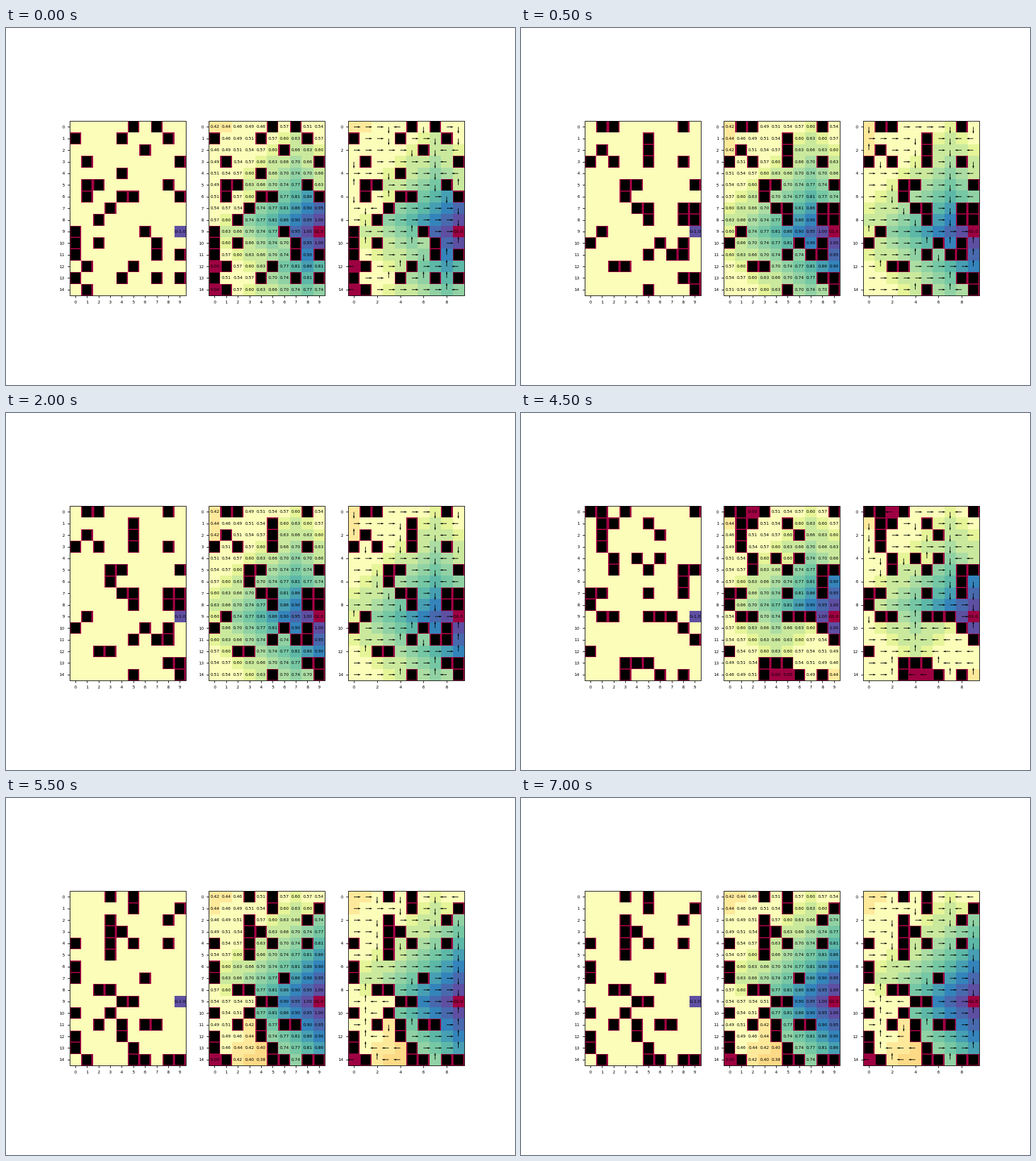
These frames come from a looping animation (894x626 px, 8000 ms). A matplotlib script:

```python
import numpy as np
import matplotlib.pyplot as plt
from matplotlib.animation import FuncAnimation
from matplotlib.patches import Rectangle

DPI = 89.4
ROWS, COLS = 15, 10
GOAL = (9, 9)
DISCOUNT = 0.95
FONT = 6
STEPS = ((0, -1), (0, 1), (-1, 0), (1, 0))  # left, right, up, down

# Wall columns, row by row
MAZE_A = [(5, 7), (0, 4, 8), (6,), (1, 9), (4,), (1, 2, 8), (1, 4, 5, 9), (3,),
          (2,), (0, 6), (0, 2, 7), (0, 7, 9), (1, 5), (0, 4, 7, 9), (1,)]
MAZE_B = [(1, 2, 8), (5,), (1, 5), (0, 2, 5, 8), (), (3, 4, 9), (3,),
          (4, 5, 8, 9), (5, 8, 9), (1,), (0, 6, 8), (5, 7, 8), (2, 3), (8, 9),
          (5, 9)]
MAZE_C = [(0, 1, 3, 9), (1, 2, 5), (1, 6), (1,), (2, 4, 6), (2, 5, 8, 9), (8,),
          (0, 1, 5, 8), (0,), (1, 2, 5, 6, 7), (8,), (9,), (0,), (3, 4, 5),
          (3, 6, 8)]
MAZE_D = [(3, 5), (5, 9), (3, 8), (3, 4), (0, 3, 5, 8), (3,), (0,), (0, 6),
          (2, 3), (4, 5), (0, 3), (2, 4, 6, 7), (0, 4), (0, 5),
          (1, 5, 6, 8, 9)]

# Value ranges that share one shade: low, high, shade
BANDS = ((0.37, 0.41, 0.39), (0.41, 0.45, 0.43),
         (0.45, 0.58, 0.514), (0.62, 0.68, 0.647))


def neighbours(cell):
    for dr, dc in STEPS:
        r, c = cell[0] + dr, cell[1] + dc
        if 0 <= r < ROWS and 0 <= c < COLS:
            yield (r, c), (dr, dc)


def solve(maze):
    """Return walls, state values and greedy moves of a maze."""
    walls = {(r, c) for r, cols in enumerate(maze) for c in cols}
    dist = {GOAL: 0}
    queue = [GOAL]
    for cell in queue:
        for near, _ in neighbours(cell):
            if near not in walls and near not in dist:
                dist[near] = dist[cell] + 1
                queue.append(near)

    values = np.zeros((ROWS, COLS))
    for cell, d in dist.items():
        if d:
            values[cell] = DISCOUNT ** (d - 1)

    moves = np.zeros((ROWS, COLS, 2))
    for cell in np.ndindex(ROWS, COLS):
        if cell in walls or cell == GOAL:
            continue
        best, move = 0, STEPS[0]
        for near, step in neighbours(cell):
            worth = 2 if near == GOAL else values[near]
            if worth > best:
                best, move = worth, step
        moves[cell] = move
    return walls, values, moves


def shade(values):
    out = values.copy()
    for low, high, tone in BANDS:
        out[(values > low) & (values < high)] = tone
    return out


def label(ax, cell, text):
    ax.text(cell[1], cell[0], text, ha="center", va="center", fontsize=FONT)


def draw_panel(ax, grid, walls, goal_text, tick_step):
    ax.clear()
    ax.imshow(grid, cmap="Spectral", vmin=0, vmax=1)
    for r, c in walls:
        ax.add_patch(Rectangle((c - 0.4, r - 0.45), 0.8, 0.9,
                               facecolor="black", linewidth=0))
    label(ax, GOAL, goal_text)
    ax.set_xticks(range(0, COLS, tick_step))
    ax.set_yticks(range(0, ROWS, tick_step))
    ax.tick_params(labelsize=FONT)


def draw(n):
    walls, values, moves = solutions[(n + 4) // 5]

    world = np.full((ROWS, COLS), 0.514)
    for cell in walls:
        world[cell] = 0
    world[GOAL] = 1
    draw_panel(axes[0], world, walls, "G-1.0", 1)

    shaded = shade(values)
    draw_panel(axes[1], shaded, walls, "G1.0", 1)
    for cell in np.ndindex(ROWS, COLS):
        if cell not in walls and cell != GOAL:
            label(axes[1], cell, f"{values[cell]:.2f}")

    draw_panel(axes[2], shaded, walls, "G1.0", 2)
    x, y = np.meshgrid(range(COLS), range(ROWS))
    axes[2].quiver(x, y, moves[..., 1], -moves[..., 0])
    axes[2].set(xlim=(-0.5, COLS - 0.5), ylim=(ROWS - 0.5, -0.5))


plt.rcParams["font.family"] = "DejaVu Sans"
solutions = [solve(m) for m in (MAZE_A, MAZE_B, MAZE_C, MAZE_D)]
fig, axes = plt.subplots(1, 3, figsize=(894.001 / DPI, 626.001 / DPI), dpi=DPI)
anim = FuncAnimation(fig, draw, frames=16, init_func=lambda: draw(0),
                     interval=500, repeat=True, repeat_delay=0)
plt.show()
```
